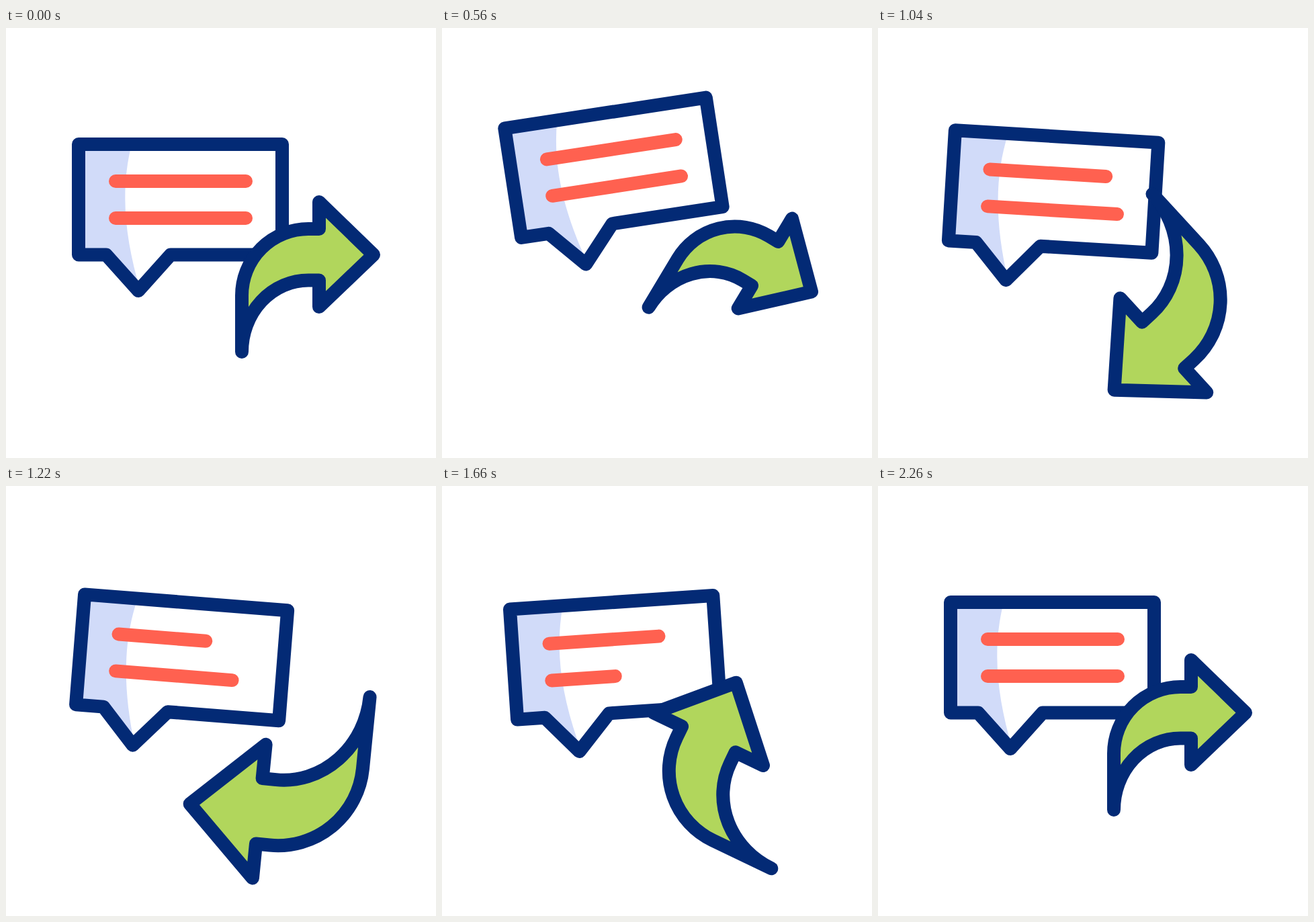
Write an HTML page that moves like this. It is 640x640 px and loops after 2400 ms.

```html
<!DOCTYPE html>
<html lang="en">
<head>
<meta charset="utf-8">
<title>Share message</title>
<style>
  html, body { margin: 0; width: 100%; height: 100%; overflow: hidden; background: #fff; }
  svg { display: block; width: 100%; height: 100%; }
  path { fill: none; stroke-width: 20; stroke-linecap: round; stroke-linejoin: round; }
  .ink { stroke: #032a75; }
  .accent { stroke: #ff6150; }
  .paper { fill: #fff; }
  .shade { fill: #d1dbf9; }
  #arrow { fill: #b1d65c; vector-effect: non-scaling-stroke; }
</style>
</head>
<body>
<svg viewBox="0 0 640 640">
  <g id="bubble">
    <path class="paper" d="M108 173H411V337.5H245L197 391L149 337.5H108Z"/>
    <path class="shade" d="M108 173H187C170 240 176 310 200 391H197L149 337.5H108Z"/>
    <path class="ink" d="M108 173H411V337.5H245L197 391L149 337.5H108Z"/>
    <path class="accent" id="line1"/>
    <path class="accent" id="line2"/>
  </g>
  <path class="ink" id="arrow" d="M351 482V398A99 99 0 0 1 450 299H466V259L547 337.5L466 415V375.5H450A99 106.5 0 0 0 351 482Z"/>
  <path class="accent" id="spark1"/>
  <path class="accent" id="spark2"/>
</svg>
<script>
  const LOOP = 2400;
  const $ = id => document.getElementById(id);

  // Each track is a list of [time in ms, value], eased between neighbours.
  const tracks = {
    bubbleTurn: [[200, 0], [667, -10], [1133, 5], [1800, -5], [2200, 0]],
    bubbleY: [[200, 0], [667, -55], [1200, 0]],
    line1: [[870, 194], [1420, 103], [1815, 194]],
    line2: [[1000, 194], [1800, 86], [2200, 194]],
    arrowTurn: [[200, 0], [2200, 360]],
    arrowPush: [[665, 0], [1200, 1], [2200, 0]],
    sparkHead: [[1800, 0], [2080, 1]],
    sparkTail: [[1960, 0], [2260, 1]]
  };

  const ease = u => u * u * (3 - 2 * u);

  function at(name, t) {
    const keys = tracks[name];
    if (t <= keys[0][0]) return keys[0][1];
    for (let i = 1; i < keys.length; i++) {
      const [t0, a] = keys[i - 1], [t1, b] = keys[i];
      if (t < t1) return a + (b - a) * ease((t - t0) / (t1 - t0));
    }
    return keys[keys.length - 1][1];
  }

  function drawSpark(id, x, y, dx, dy, from, to) {
    const visible = to - from > 0.005;
    $(id).setAttribute("d", visible
      ? `M${x + dx * from} ${y + dy * from}L${x + dx * to} ${y + dy * to}` : "");
  }

  function draw(t) {
    const v = name => at(name, t);

    $("bubble").setAttribute("transform",
      `translate(0 ${v("bubbleY")}) rotate(${v("bubbleTurn")} 259.5 282)`);
    $("line1").setAttribute("d", `M163 228h${v("line1")}`);
    $("line2").setAttribute("d", `M163 283h${v("line2")}`);

    const push = v("arrowPush");
    $("arrow").setAttribute("transform",
      `translate(${449 - 46.4 * push} ${370.5 + 73.2 * push}) ` +
      `rotate(${v("arrowTurn")}) scale(${1 + 0.28 * push}) translate(-449 -370.5)`);

    const head = v("sparkHead"), tail = v("sparkTail");
    drawSpark("spark1", 528, 254, 17, -46, tail, head);
    drawSpark("spark2", 552, 277, 46, -17, tail, head);
  }

  function tick() {
    draw(performance.now() % LOOP);
    requestAnimationFrame(tick);
  }
  tick();
</script>
</body>
</html>
```
